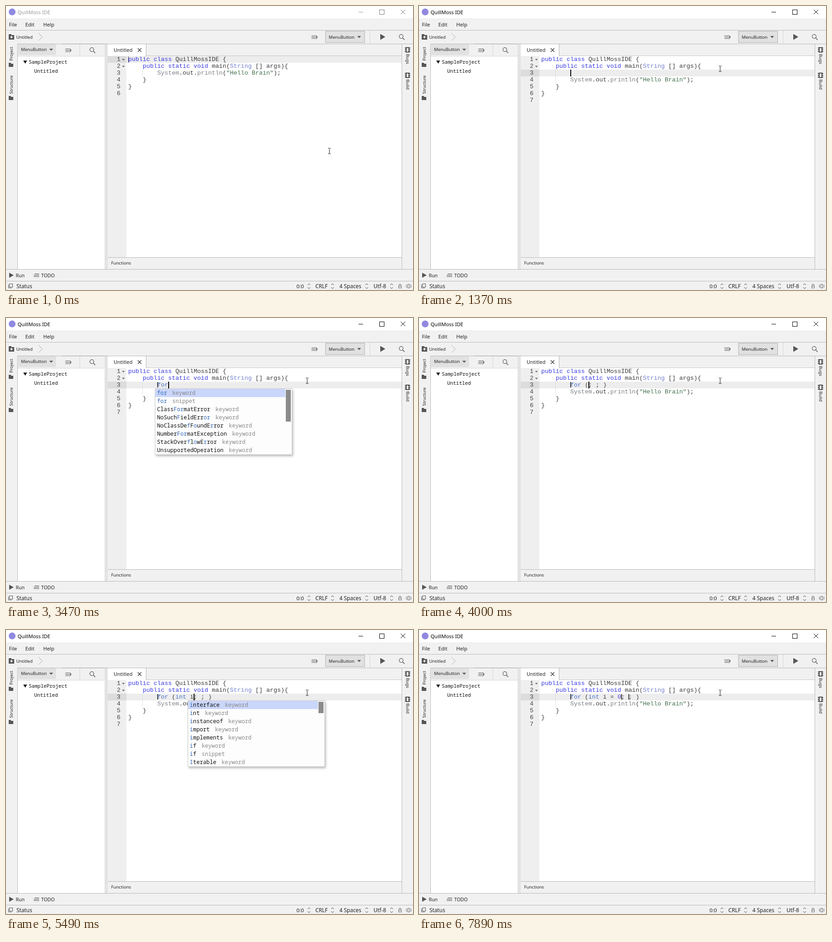
An HTML page with a canvas that plays this animation: 896x625 px, repeating every 8 s.

```html
<!DOCTYPE html>
<html lang="en">
<head>
<meta charset="utf-8">
<title>QuillMoss IDE</title>
<style>
html, body { margin: 0; width: 100%; height: 100%; overflow: hidden; background: #f1f1f1; }
canvas { display: block; width: 896px; height: 625px; }
</style>
</head>
<body>
<canvas id="stage" width="896" height="625"></canvas>
<script>
const g = document.getElementById('stage').getContext('2d');
const UI = '"Noto Sans", "Open Sans", sans-serif';
const MONO = '"Noto Sans Mono", "DejaVu Sans Mono", monospace';
const CODE = '"Liberation Mono", monospace';
const LOOP = 8000, CH = 8, LEFT = 269, TOP = 110, ROW = 15;

// [time, x, y]
const mouse = [[0, 712, 319], [70, 676, 240], [130, 650, 188], [360, 653, 176],
  [430, 658, 160], [510, 662, 146], [590, 663, 138]];
// [time, typed text]; the snippet opens at SNIPPET and typing goes on inside it
const FOCUS = 670, BRACKET = 820, ENTER = 1370, SNIPPET = 4000, TAB = 7260;
const typing = [[ENTER, ''], [2230, 'f'], [2300, 'fo'], [2460, 'for'], [SNIPPET, ''],
  [4860, 'i'], [5010, 'in'], [5180, 'int'], [5250, 'int '], [5490, 'int i'],
  [5870, 'int i '], [6100, 'int i ='], [6250, 'int i = '], [6420, 'int i = 0']];
const caretOff = [[1280, ENTER], [1980, 2230], [3070, 3470], [4630, 4860], [7030, TAB], [7890, LOOP]];
// [time, column] of thin marks left in line 3
const marks = [[1980, 8], [TAB, 22], [7890, 24]];
// [from, to, column, query, thumb height, items]
const K = ' keyword', S = ' snippet';
const popups = [
  [2230, 2300, 8, 'f', 25, ['for' + K, 'for' + S, 'float' + K, 'findbyid' + S, 'findall' + S, 'finally' + K, 'final' + K, 'Float' + K]],
  [2300, 2460, 8, 'fo', 44, ['for' + K, 'for' + S, 'float' + K, 'Float' + K, 'instanceof' + K, 'ClassFormatError' + K, 'NoSuchFieldError' + K, 'VerifyError' + K]],
  [2460, SNIPPET, 8, 'for', 70, ['for' + K, 'for' + S, 'ClassFormatError' + K, 'NoSuchFieldError' + K, 'NoClassDefFoundError' + K, 'NumberFormatException' + K, 'StackOverflowError' + K, 'UnsupportedOperation' + K]],
  [4860, 5010, 13, 'i', 25, ['interface' + K, 'int' + K, 'instanceof' + K, 'import' + K, 'implements' + K, 'if' + K, 'if' + S, 'Iterable' + K]],
  [5010, 5180, 13, 'in', 34, ['interface' + K, 'int' + K, 'instanceof' + K, 'InterruptedException' + K, 'InternalError' + K, 'Integer' + K, 'println local', 'InstantiationException' + K]],
  [5180, 5250, 13, 'int', 43, ['interface' + K, 'int' + K, 'InterruptedException' + K, 'InternalError' + K, 'Integer' + K, 'println local', 'instanceof' + K, 'InstantiationException' + K]],
  [5490, 5870, 17, 'i', 25, ['interface' + K, 'int' + K, 'instanceof' + K, 'import' + K, 'implements' + K, 'if' + K, 'if' + S, 'Iterable' + K]]
];

const last = (list, t) => list.filter(e => e[0] <= t).pop();

function box(x, y, w, h, fill) { g.fillStyle = fill; g.fillRect(x, y, w, h); }
function frame(x, y, w, h, color) { g.strokeStyle = color; g.lineWidth = 1; g.strokeRect(x + .5, y + .5, w - 1, h - 1); }
function text(s, x, y, size, color = '#222', font = UI, align = 'left') {
  g.font = size + 'px ' + font;
  g.textAlign = align;
  g.fillStyle = color;
  g.fillText(s, x, y);
}
// flat list of x, y pairs
function line(color, width, ...p) {
  g.strokeStyle = color;
  g.lineWidth = width;
  g.beginPath();
  for (let i = 0; i < p.length; i += 2) g.lineTo(p[i], p[i + 1]);
  g.stroke();
}
function shape(color, ...p) {
  g.fillStyle = color;
  g.beginPath();
  for (let i = 0; i < p.length; i += 2) g.lineTo(p[i], p[i + 1]);
  g.fill();
}
function turned(s, x, y, angle, size) {
  g.save();
  g.translate(x, y);
  g.rotate(angle);
  text(s, 0, 0, size);
  g.restore();
}
const down = (x, y, r, color = '#555') => shape(color, x - r, y - r / 2, x + r, y - r / 2, x, y + r / 2 + .5);
const play = (x, y, w, h) => shape('#555', x, y - h / 2, x + w, y, x, y + h / 2);

function folder(x, y, w, h) {
  box(x, y + 2, w, h - 2, '#555');
  box(x, y, w / 2, 3, '#555');
}
function search(x, y) {
  g.strokeStyle = '#555';
  g.lineWidth = 1.2;
  g.beginPath();
  g.arc(x - 1, y - 1, 4.3, 0, 7);
  g.stroke();
  line('#555', 1.5, x + 2, y + 2, x + 6.5, y + 6.5);
}
function listArrow(x, y) {
  for (const d of [-3, 0, 3]) line('#555', 1, x - 6.5, y + d + .5, x + (d ? 2 : 6), y + d + .5);
  line('#555', 1.2, x + 3, y - 3.5, x + 6.5, y + .5, x + 3, y + 4.5);
}
function chip(x, y) {
  g.strokeStyle = '#222';
  g.lineWidth = 1.5;
  g.strokeRect(x - 3, y - 5, 6, 10);
  for (const d of [-4, 0, 4]) {
    line('#222', 1.5, x - 6, y + d, x - 3, y + d);
    line('#222', 1.5, x + 3, y + d, x + 6, y + d);
  }
}
function upDown(x) {
  line('#444', 1, x - 3, 614, x, 611, x + 3, 614);
  line('#444', 1, x - 3, 619, x, 622, x + 3, 619);
}

function drawWindow(focused) {
  const ink = focused ? '#000' : '#999';
  box(0, 0, 896, 625, '#f1f1f1');
  box(0, 0, 896, 27, '#fff');
  g.fillStyle = '#9189df';
  g.beginPath();
  g.arc(13.5, 13, 7.5, 0, 7);
  g.fill();
  text('QuillMoss IDE', 25.5, 18, 11, ink);
  line(ink, 1, 776, 13.5, 786, 13.5);
  frame(822, 8, 11, 11, focused ? '#000' : '#777');
  line(focused ? '#000' : '#777', 1, 869, 8, 879, 18);
  line(focused ? '#000' : '#777', 1, 879, 8, 869, 18);

  text('File', 6.5, 45, 11.2);
  text('Edit', 42.5, 45, 11.2);
  text('Help', 82, 45, 11.2);
  box(0, 53, 896, 1, '#b8b8b8');

  folder(6, 62, 12, 12);
  box(11, 66, 2, 5, '#fff');
  box(9.5, 67.5, 5, 2, '#fff');
  text('Untitled', 22.5, 72, 9.6);
  line('#aaa', 1, 72, 60, 80, 68, 72, 76);
  listArrow(679, 68);
  box(703, 55, 87, 26, '#e1e1e1');
  frame(703, 55, 87, 26, '#adadad');
  text('MenuButton', 710.5, 72, 9.6);
  down(777.5, 68, 4);
  box(801, 54, 1, 28, '#d4d4d4');
  play(824, 68, 11, 13);
  search(871, 68);
  box(25, 83, 871, 1, '#b8b8b8');

  // left strip and project panel
  turned('Project', 15, 120.5, -Math.PI / 2, 9.4);
  folder(6, 125, 10, 9);
  turned('Structure', 15, 193.5, -Math.PI / 2, 9.4);
  folder(6, 198, 10, 9);
  box(26, 84, 191, 27, '#f1f1f1');
  box(26, 110, 191, 469, '#fff');
  box(25, 83, 1, 497, '#b8b8b8');
  box(27, 84, 83, 24, '#e1e1e1');
  text('MenuButton', 33, 99, 9.6);
  down(99.5, 96, 4);
  box(122, 83, 95, 1, '#999');
  listArrow(137, 97);
  box(162, 84, 1, 26, '#d4d4d4');
  search(190, 97);
  box(26, 110, 191, 1, '#d8d8d8');
  shape('#222', 38, 120, 46.5, 120, 42.3, 127);
  text('SampleProject', 50, 127, 10.9, '#111', MONO);
  text('Untitled', 62, 147, 10.9, '#111', MONO);
  box(217, 84, 7, 496, '#e3e3e3');

  // editor tab and right strip
  box(224, 109, 648, 1, '#c4c4c4');
  box(224, 84, 84, 26, '#fff');
  box(308, 84, 1, 26, '#b0b0b0');
  text('Untitled', 237, 101, 11);
  line('#333', 1.3, 290, 93, 298, 101);
  line('#333', 1.3, 298, 93, 290, 101);
  box(871, 83, 1, 497, '#b8b8b8');
  chip(884, 96.5);
  turned('Bugs', 880.5, 105.5, Math.PI / 2, 9.4);
  chip(884, 152.5);
  turned('Build', 880.5, 161.5, Math.PI / 2, 9.4);

  // lower bars
  box(224, 553, 647, 1, '#b8b8b8');
  text('Functions', 231.5, 569, 9.6);
  box(0, 579, 896, 1, '#b8b8b8');
  play(7, 592.5, 10, 11);
  text('Run', 21.5, 596.5, 10.5);
  for (const d of [0, 3, 6]) line('#444', 1, d ? 61 : 63, 589.5 + d, 73, 589.5 + d);
  text('TODO', 77.5, 596.5, 10.5);
  box(0, 605, 896, 1, '#b8b8b8');
  frame(7, 611, 8, 8, '#555');
  line('#555', 1, 5.5, 613, 5.5, 620.5, 13, 620.5);
  text('Status', 23, 621, 11.8);
  text('0:0', 639.5, 621, 11.6);
  text('CRLF', 681, 621, 11.8);
  text('4 Spaces', 734, 621, 11.8);
  text('Utf-8', 809, 621, 12);
  [667, 719, 794, 849].forEach(upDown);
  frame(864, 616, 7, 5, '#666');
  line('#666', 1, 865.5, 616, 865.5, 612.5, 869.5, 612.5, 869.5, 616);
  frame(884, 612, 5, 9, '#666');
  line('#666', 1, 881.5, 613, 881.5, 620);
  line('#666', 1, 891.5, 613, 891.5, 620);
}

const rules = [
  [/^"[^"]*"/, '#41704a'], [/^(public|class|static|void)\b/, '#3838e2'],
  [/^(for|int)\b/, '#4870cc'], [/^String\b/, '#7380cc'], [/^(System|println)\b/, '#7c8088'],
  [/^\d/, '#6050d0'], [/^\w+/, '#3a3a3a'], [/^./, '#3a3a3a']
];
function codeLine(s, row) {
  for (let col = 0; col < s.length;) {
    const rest = s.slice(col);
    const [rule, color] = rules.find(r => r[0].test(rest));
    const word = rest.match(rule)[0];
    text(word, LEFT + col * CH, TOP + row * ROW + 11, 13.333, color, CODE);
    col += word.length;
  }
}

function drawEditor(t, entered) {
  const active = entered ? 2 : t < FOCUS ? 0 : 1;
  const typed = entered ? last(typing, t)[1] : '';
  const inside = t >= SNIPPET;
  const lines = ['public class QuillMossIDE {', '    public static void main(String [] args){',
    '        System.out.println("Hello Brain");', '    }', '}', ''];
  if (entered) lines.splice(2, 0, '        ' + (inside ? 'for (' + typed + '; ; )' : typed));

  box(224, TOP, 41, 443, '#efefef');
  box(265, TOP, 606, 443, '#fff');
  const y = TOP + active * ROW;
  box(224, y, 41, ROW, '#dcdcdc');
  box(265, y, 606, ROW, '#ededed');
  for (let i = 2; i < (entered ? 4 : 3); i++) box(300, TOP + i * ROW, 1, ROW, '#dedede');
  lines.forEach((s, i) => {
    text(i + 1, 252, TOP + i * ROW + 11, 13.333, '#444', CODE, 'right');
    if (i < 2) down(258.5, TOP + i * ROW + 8, 3, '#666');
    codeLine(s, i);
  });
  if (t >= BRACKET && !entered) {
    g.strokeStyle = '#aaa';
    g.lineWidth = 1;
    g.beginPath();
    g.roundRect(300.5, 154.5, 9, 15, 2);
    g.stroke();
  }

  for (const [from, col] of marks) if (t >= from) box(LEFT + col * CH + 64 * 0, 141, 1.5, 12, '#111');
  if (t < FOCUS) box(LEFT, TOP + 1, 1, 13, '#444');
  else if (!caretOff.some(([a, b]) => t >= a && t < b)) {
    const col = !entered ? 44 : 8 + (inside ? 5 : 0) + typed.length + (t >= TAB ? 2 : 0);
    box(LEFT + col * CH - (entered ? 0 : 1), y, 2, ROW, '#000');
  }
}

function shadowBox(x, y, w, h) {
  g.save();
  g.shadowColor = 'rgba(0,0,0,.28)';
  g.shadowBlur = 5;
  g.shadowOffsetX = 2;
  g.shadowOffsetY = 3;
  box(x, y, w, h, '#fdfdfd');
  g.restore();
  frame(x, y, w, h, '#d0d0d0');
}

function drawPopup(t) {
  const p = popups.find(q => t >= q[0] && t < q[1]);
  if (!p) return;
  const [, , col, query, thumb, items] = p;
  const x = LEFT + col * CH - 5, second = t >= 3850 && t < SNIPPET;
  shadowBox(x, 155, 302, 146);
  box(x + 1, second ? 174 : 156, 286, 18, '#cad6fa');
  box(x + 288, 158, 11, thumb, '#8b8b8b');
  items.forEach((item, i) => {
    const [name, kind] = item.split(' ');
    const y = 168.5 + i * 18;
    let hit = 0, pen = x + 4.5;
    for (const c of name) {
      const match = hit < query.length && c.toLowerCase() === query[hit];
      if (match) hit++;
      text(c, pen, y, 12.2, match ? '#2f68b8' : '#111', MONO);
      pen += 7.32;
    }
    text(kind, pen + 11.5, y, 12.2, '#888', MONO);
  });
  if (second) {
    shadowBox(x, 305, 92, 55);
    text('for', x + 6, 322, 12.2, '#111', MONO);
    line('#bbb', 1, x + 5, 332.5, x + 87, 332.5);
    text('for (; ; )', x + 6, 350, 12.2, '#111', MONO);
  }
}

function drawMouse(t) {
  const [, x, y] = last(mouse, t);
  box(x - .5, y - 5, 1, 11, '#111');
  for (const d of [-6, 6]) {
    box(x - 3, y + d - .5, 2.5, 1, '#111');
    box(x + .5, y + d - .5, 2.5, 1, '#111');
  }
}

const start = performance.now();
function draw(now) {
  const t = Math.max(0, now - start) % LOOP;
  drawWindow(t >= FOCUS);
  drawEditor(t, t >= ENTER);
  drawPopup(t);
  drawMouse(t);
  requestAnimationFrame(draw);
}
draw(start);
</script>
</body>
</html>
```
